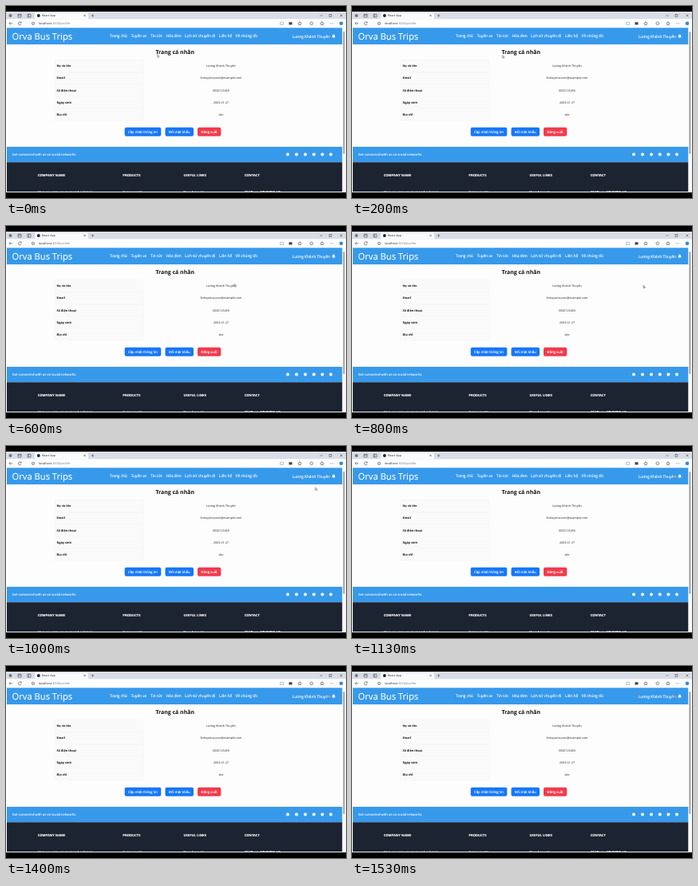
Recreate the animation shown at these times as an HTML page. Size 426 by 240 pixels, loop 1590 ms.

```html
<!DOCTYPE html>
<html lang="vi">
<head>
<meta charset="utf-8">
<title>Profile page</title>
<style>
  html, body { margin: 0; width: 100%; height: 100%; overflow: hidden; background: #000; }
  svg { display: block; width: 426px; height: 240px; }
  text {
    font-family: "Open Sans", "Noto Sans", sans-serif;
    text-rendering: geometricPrecision;
  }
  .ui { font-size: 3.6px; fill: #222; }
  .url { font-size: 3.85px; }
  .icon { fill: none; stroke: #555; stroke-width: .65; }
  .white { fill: #fff; }
  .white text { stroke: #fff; stroke-width: .12; }
  .brand { font-size: 11.2px; }
  .nav { font-size: 4.75px; }
  .title { font-size: 6.95px; font-weight: 700; fill: #111; }
  .label { font-size: 3.75px; font-weight: 700; fill: #111; }
  .value { font-size: 3.7px; fill: #222; }
  .button { font-size: 4.27px; }
  .social { font-size: 4.1px; }
  .head { font-size: 4.17px; font-weight: 700; }
  .mid { text-anchor: middle; }
  .end { text-anchor: end; }
  .grid { fill: none; stroke: #f0f0f0; stroke-width: .5; }

  /* 24 pictures per loop: each stretch advances in whole pictures */
  #cursor { animation: move 1590ms infinite; }
  @keyframes move {
    0%       { transform: translate(189.5px, 60.5px); animation-timing-function: steps(3); }
    12.5%    { transform: translate(188.5px, 61.5px); animation-timing-function: steps(3); }
    25%      { transform: translate(207.5px, 70.5px); animation-timing-function: steps(6); }
    50%      { transform: translate(365px, 74px); animation-timing-function: steps(5); }
    70.8333% { transform: translate(402.5px, 37px); animation-timing-function: steps(3); }
    83.3333%, 100% { transform: translate(402.5px, 36.5px); animation-timing-function: steps(1); }
  }
</style>
</head>
<body>
<svg viewBox="0 0 426 240">
  <defs>
    <clipPath id="window"><rect y="7" width="426" height="226"/></clipPath>
    <path id="star" d="M0-2.2l.7 1.4 1.5.2-1.1 1.1.3 1.5-1.4-.7-1.4.7.3-1.5-1.1-1.1 1.5-.2z"/>
  </defs>
  <rect width="426" height="240"/>

  <g clip-path="url(#window)">
    <rect y="7" width="426" height="226" fill="#fdfdfd"/>

    <!-- tab strip -->
    <rect y="7" width="426" height="9.5" fill="#d8dde6"/>
    <path d="M36 16.5V10q0-1.5 1.5-1.5h64q1.5 0 1.5 1.5v6.5z" fill="#fafbfd"/>
    <circle cx="5.5" cy="12" r="2" fill="#777"/>
    <g class="icon">
      <path d="M15 10.2h4v3.8h-4zM15 11.4h4M27 10.2h4v3.8h-4zM28.3 10.2v3.8"/>
      <path d="M97.3 10.7l2.4 2.4m0-2.4l-2.4 2.4M106.8 12h3.4m-1.7-1.7v3.4"/>
      <path d="M393.5 12h3M405 10.5h2.8v2.8H405zM418.6 10.5l2.8 2.8m0-2.8l-2.8 2.8"/>
    </g>
    <circle cx="40.8" cy="12" r="2" fill="#23272f"/>
    <text class="ui" x="45" y="13.3">React App</text>

    <!-- address bar -->
    <rect y="16.5" width="426" height="10.8" fill="#fbfcfd"/>
    <rect x="29" y="17.7" width="350" height="8.2" rx="4" fill="#fff"/>
    <g class="icon">
      <path d="M8 21.8H4m1.7-1.7L4 21.8l1.7 1.7"/>
      <path d="M19 20.7a2 2 0 1 0 .2 1.8M19.2 19.5v1.5h-1.5"/>
      <circle cx="34" cy="21.8" r="1.7"/><path d="M34 21.4v1.3"/>
      <path d="M343.5 20.2h4v3.2h-4z" stroke="#8aa4c4"/>
      <use href="#star" x="368" y="21.8"/>
      <circle cx="382.8" cy="21.8" r="1.8"/>
      <use href="#star" x="396" y="21.8"/>
      <path d="M406 21.8h4.4" stroke-dasharray=".8 1"/>
    </g>
    <path d="M354.5 20.2h4v3.2h-4z" fill="#444"/>
    <circle cx="420" cy="21.8" r="2.3" fill="#3586d4"/>
    <text class="ui url" x="41" y="23.1">localhost<tspan fill="#777">:3000/profile</tspan></text>

    <!-- header -->
    <rect x="1" y="27.3" width="420.5" height="20.7" fill="#3799ea"/>
    <g class="white">
      <text class="brand" x="7.5" y="41.8">Orva Bus Trips</text>
      <g class="nav">
        <text x="130" y="39">Trang chủ</text>
        <text x="156.7" y="39">Tuyến xe</text>
        <text x="181" y="39">Tin tức</text>
        <text x="200.6" y="39">Hóa đơn</text>
        <text x="224" y="39">Lịch sử chuyến đi</text>
        <text x="267" y="39">Liên hệ</text>
        <text x="287.6" y="39">Về chúng tôi</text>
        <text class="end" x="406" y="39.5">Lương Khánh Thuyên</text>
      </g>
      <path d="M408.3 39.3q.7-.7.7-2.2a1.5 1.5 0 0 1 3 0q0 1.5.7 2.2zM409.8 39.7h1.4q-.7 1-1.4 0z"/>
    </g>

    <!-- profile -->
    <text class="title mid" x="211.7" y="60.4">Trang cá nhân</text>
    <rect x="61" y="67.5" width="111" height="75.5" fill="#fafafa"/>
    <path class="grid" d="M61 67.5h111v75.5H61zM61 82.6h111M61 97.7h111M61 112.8h111M61 127.9h111"/>
    <g class="label">
      <text x="63.5" y="76.3">Họ và tên</text>
      <text x="63.5" y="91.4">Email</text>
      <text x="63.5" y="106.5">Số điện thoại</text>
      <text x="63.5" y="121.6">Ngày sinh</text>
      <text x="63.5" y="136.7">Địa chỉ</text>
    </g>
    <g class="value mid">
      <text x="269.5" y="76.3">Lương Khánh Thuyên</text>
      <text x="269.5" y="91.4">lkthuyenvuonx@example.com</text>
      <text x="269.5" y="106.5">0000123456</text>
      <text x="269.5" y="121.6">2003-01-27</text>
      <text x="269.5" y="136.7">abc</text>
    </g>
    <g fill="#1677f7">
      <rect x="148.7" y="151.7" width="45.6" height="11" rx="2"/>
      <rect x="199.5" y="151.7" width="35.5" height="11" rx="2"/>
      <rect x="240" y="151.7" width="29.3" height="11" rx="2" fill="#f23a4c"/>
    </g>
    <g class="button white mid">
      <text x="171.5" y="158.7">Cập nhật thông tin</text>
      <text x="217.3" y="158.7">Đổi mật khẩu</text>
      <text x="254.7" y="158.7">Đăng xuất</text>
    </g>

    <!-- footer -->
    <rect x="1" y="176" width="420.5" height="19.3" fill="#3799ea"/>
    <rect x="1" y="195.3" width="420.5" height="36.9" fill="#1c2331"/>
    <g class="white">
      <text class="social" x="7.7" y="187">Get connected with us on social networks:</text>
      <circle cx="353" cy="185.5" r="2"/>
      <circle cx="364" cy="185.5" r="2"/>
      <circle cx="375" cy="185.5" r="2"/>
      <circle cx="385.8" cy="185.5" r="2"/>
      <circle cx="396.4" cy="185.5" r="2"/>
      <circle cx="407" cy="185.5" r="2"/>
      <g class="head">
        <text x="39.7" y="213">COMPANY NAME</text>
        <text x="146.3" y="213">PRODUCTS</text>
        <text x="222.4" y="213">USEFUL LINKS</text>
        <text x="298.7" y="213">CONTACT</text>
      </g>
      <g class="social">
        <text x="39.7" y="234.3">Here you can use rows and columns</text>
        <text x="146.3" y="234.3">Components</text>
        <text x="222.4" y="234.3">Your Account</text>
        <text x="298.7" y="234.3">Old Town, NT 10000, US</text>
      </g>
    </g>
    <rect y="232.2" width="426" height=".8" fill="#fdfdfd"/>

    <!-- scrollbar -->
    <rect x="421.5" y="27.3" width="4.5" height="205.7" fill="#f8f8f8"/>
    <rect x="422.5" y="32" width="1.8" height="153" rx=".9" fill="#999"/>

    <path id="cursor" d="M0 0v3.4l.8-.7.6 1.2.6-.3-.6-1.2h1.1z" fill="#fff" stroke="#222" stroke-width=".4"/>
  </g>
</svg>
</body>
</html>
```
